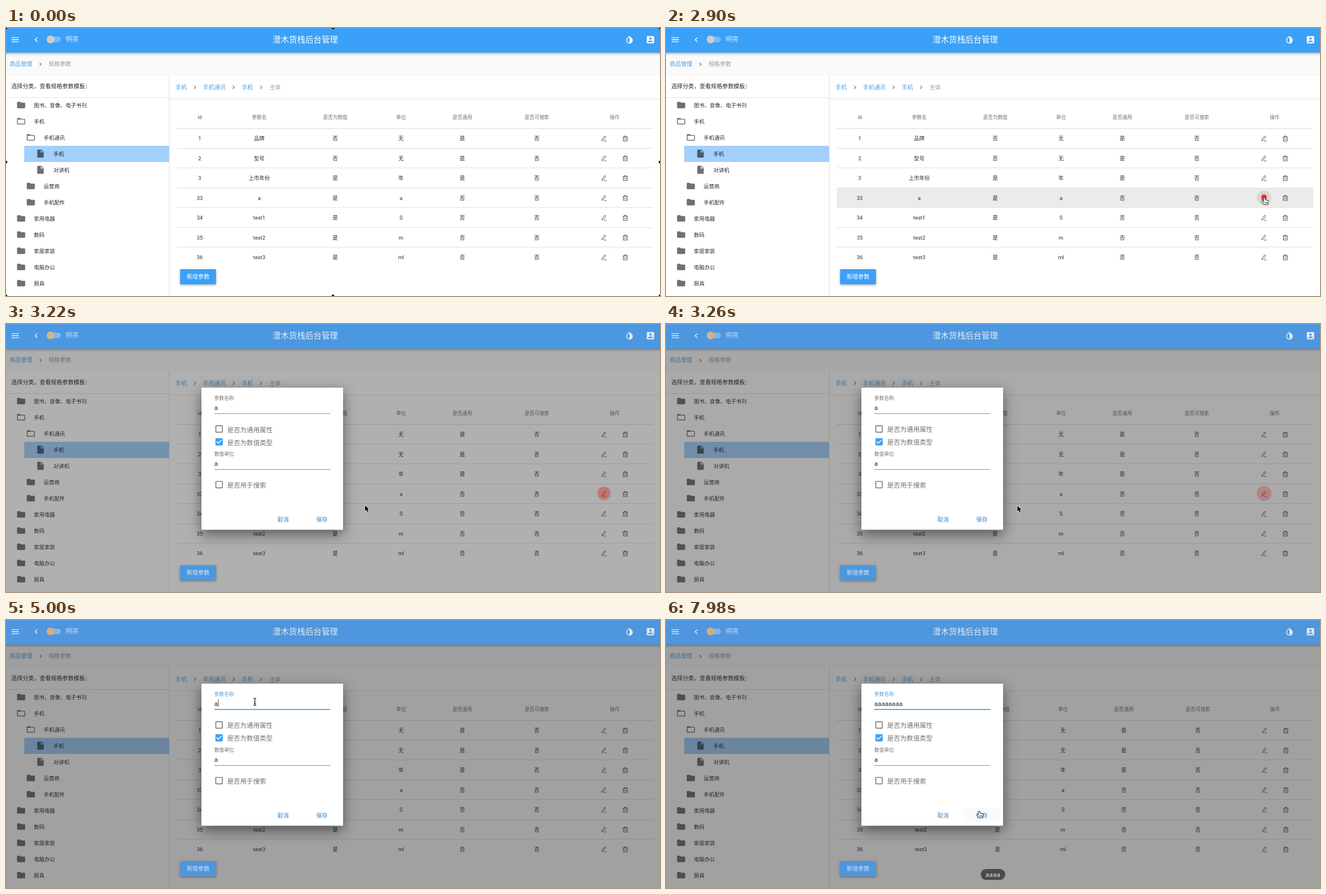
An HTML page with a canvas for the animation above (8000 ms loop, 1168 by 480 pixels).

```html
<!DOCTYPE html>
<html lang="zh-CN">
<head>
<meta charset="utf-8">
<title>后台管理</title>
<style>
html, body { margin: 0; width: 100%; height: 100%; overflow: hidden; background: #fafafa; }
canvas { display: block; width: 1168px; height: 480px; }
</style>
</head>
<body>
<canvas id="stage"></canvas>
<script>
const W = 1168, H = 480, LOOP = 8000;
const FONT = 'Roboto, "Noto Sans CJK SC", "Noto Sans CJK", sans-serif';
const BLUE = '#3ba0f8', INK = 'rgba(0,0,0,.84)', SOFT = 'rgba(0,0,0,.56)', LINK = '#4f9fe0', LINE = '#e1e1e1';
const canvas = document.getElementById('stage');
const ratio = window.devicePixelRatio || 1;
canvas.width = W * ratio;
canvas.height = H * ratio;
const c = canvas.getContext('2d');

// 24-unit icon outlines
const ICON = {
  menu: 'M3 18h18v-2H3v2zm0-5h18v-2H3v2zm0-7v2h18V6H3z',
  back: 'M15.41 7.41L14 6l-6 6 6 6 1.41-1.41L10.83 12z',
  next: 'M10 6L8.59 7.41 13.17 12l-4.58 4.59L10 18l6-6z',
  drop: 'M17.66 7.93L12 2.27 6.34 7.93c-3.12 3.12-3.12 8.19 0 11.31C7.9 20.8 9.95 21.58 12 21.58c2.05 0 4.1-.78 5.66-2.34 3.12-3.12 3.12-8.19 0-11.31zM12 19.59c-1.6 0-3.11-.62-4.24-1.76C6.62 16.69 6 15.19 6 13.59s.62-3.11 1.76-4.24L12 5.1v14.49z',
  user: 'M3 5v14c0 1.1.89 2 2 2h14c1.1 0 2-.9 2-2V5c0-1.1-.9-2-2-2H5c-1.11 0-2 .9-2 2zm12 4c0 1.66-1.34 3-3 3s-3-1.34-3-3 1.34-3 3-3 3 1.34 3 3zm-9 8c0-2 4-3.1 6-3.1s6 1.1 6 3.1v1H6v-1z',
  folder: 'M10 4H4c-1.1 0-1.99.9-1.99 2L2 18c0 1.1.9 2 2 2h16c1.1 0 2-.9 2-2V8c0-1.1-.9-2-2-2h-8l-2-2z',
  open: 'M20 6h-8l-2-2H4c-1.1 0-1.99.9-1.99 2L2 18c0 1.1.9 2 2 2h16c1.1 0 2-.9 2-2V8c0-1.1-.9-2-2-2zm0 12H4V8h16v10z',
  file: 'M6 2c-1.1 0-1.99.9-1.99 2L4 20c0 1.1.89 2 1.99 2H18c1.1 0 2-.9 2-2V8l-6-6H6zm7 7V3.5L18.5 9H13z',
  box: 'M19 5v14H5V5h14m0-2H5c-1.1 0-2 .9-2 2v14c0 1.1.9 2 2 2h14c1.1 0 2-.9 2-2V5c0-1.1-.9-2-2-2z',
  checked: 'M19 3H5c-1.11 0-2 .9-2 2v14c0 1.1.89 2 2 2h14c1.11 0 2-.9 2-2V5c0-1.1-.89-2-2-2zm-9 14l-5-5 1.41-1.41L10 14.17l7.59-7.59L19 8l-9 9z'
};
for (const name in ICON) ICON[name] = new Path2D(ICON[name]);

const TREE = [
  [0, 'folder', '图书、音像、电子书刊'], [0, 'open', '手机'], [1, 'open', '手机通讯'],
  [2, 'file', '手机'], [2, 'file', '对讲机'], [1, 'folder', '运营商'], [1, 'folder', '手机配件'],
  [0, 'folder', '家用电器'], [0, 'folder', '数码'], [0, 'folder', '家居家装'],
  [0, 'folder', '电脑办公'], [0, 'folder', '厨具'], [0, 'folder', '']
];
const HEADS = ['id', '参数名', '是否为数值', '单位', '是否通用', '是否可搜索', '操作'];
const ROWS = [
  ['1', '品牌', '否', '无', '是', '否'], ['2', '型号', '否', '无', '是', '否'],
  ['3', '上市年份', '是', '年', '是', '否'], ['33', 'a', '是', 'a', '否', '否'],
  ['34', 'test1', '是', 'S', '否', '否'], ['35', 'test2', '是', 'm', '否', '否'],
  ['36', 'test3', '是', 'ml', '否', '否']
];
const COL_X = [346, 452.3, 588, 705.5, 815, 948, 1087];
const COL_SHIFT = [0, 2.8, 4, 3.5, 2.8, 2, 0.6];

// each key press: time its bubble shows, time the field updates
const KEYS = [[5520, 5640], [5800, 5820], [6000, 6020], [6520, 6560], [6880, 6920], [7060, 7080], [7240, 7260]];
const CLICKS = [[1240, 1068, 304], [1960, 1068, 304], [2860, 1068, 303], [4240, 444, 146]];
const PATH = [
  [480, 676, 376], [640, 1067.5, 277], [1060, 1067.5, 277], [1200, 1068.5, 305.5], [3060, 1068.5, 304.5],
  [3240, 627.5, 325.5], [3460, 627.5, 325.5], [4220, 444.5, 146.5], [6520, 444.5, 146.5], [6580, 444.5, 148.5],
  [7330, 444.5, 148.5], [7590, 559, 342.5], [LOOP, 559, 342.5]
];

const clamp = x => Math.max(0, Math.min(1, x));
const ramp = (t, a, b) => clamp((t - a) / (b - a));
const smooth = x => x * x * (3 - 2 * x);
const mix = (a, b, k) => 'rgb(' + a.map((v, i) => Math.round(v + (b[i] - v) * k)) + ')';

// cubic-bezier(.25, .8, .25, 1)
function swift(x) {
  let lo = 0, hi = 1;
  for (let i = 0; i < 20; i++) {
    const s = (lo + hi) / 2;
    if (.75 * s * (1 - s) + s ** 3 < x) lo = s; else hi = s;
  }
  const r = 1 - lo;
  return x >= 1 ? 1 : 2.4 * r * r * lo + 3 * r * lo * lo + lo ** 3;
}

function rect(x, y, w, h, fill) {
  c.fillStyle = fill;
  c.fillRect(x, y, w, h);
}

function round(x, y, w, h, r, fill) {
  c.beginPath();
  c.roundRect(x, y, w, h, r);
  c.fillStyle = fill;
  c.fill();
}

function disc(x, y, r, fill) {
  c.beginPath();
  c.arc(x, y, r, 0, 7);
  c.fillStyle = fill;
  c.fill();
}

// y is the optical middle of the line
function text(s, x, y, size, fill, align = 'left', weight = 400) {
  c.font = `${weight} ${size}px ${FONT}`;
  c.textAlign = align;
  c.fillStyle = fill;
  c.fillText(s, x, y + size * .37);
}

function icon(name, x, y, fill, size = 17.45) {
  c.save();
  c.translate(x - size / 2, y - size / 2);
  c.scale(size / 24, size / 24);
  c.fillStyle = fill;
  c.fill(ICON[name], 'evenodd');
  c.restore();
}

function shadow(color, blur, y) {
  c.shadowColor = color;
  c.shadowBlur = blur * ratio;
  c.shadowOffsetY = y * ratio;
}

function header(k) {
  const white = mix([255, 255, 255], [228, 234, 238], k);
  c.save();
  shadow('rgba(0,0,0,.38)', 5, 1.5);
  rect(-10, -10, W + 20, 54, mix([59, 160, 248], [78, 150, 222], k));
  c.restore();
  icon('menu', 16.5, 21, white);
  icon('back', 54, 21, white);
  round(75, 15.5, 23, 10, 5, 'rgba(255,255,255,.3)');
  disc(79.5, 20.5, 7, mix([211, 203, 195], [210, 174, 133], k));
  text('明亮', 106.5, 20, 11.5, mix([228, 238, 247], [205, 217, 228], k));
  text('澄木货栈后台管理', 534.5, 21, 14.6, white, 'center', 500);
  icon('drop', 1113.5, 21, white);
  icon('user', 1151, 21, white);
}

function addButton(k) {
  c.save();
  shadow('rgba(0,0,0,.35)', 4, 1.5);
  round(311, 432, 64, 27, 1.5, mix([59, 160, 248], [78, 150, 222], k));
  c.restore();
  text('新增参数', 343, 445.5, 10.2, mix([255, 255, 255], [220, 226, 230], k), 'center', 500);
}

function pencil(x, y) {
  c.stroke(new Path2D(`M${x - 3.6} ${y + 4.2}l.5 -2.6l4.6 -6.2l2 1.5l-4.6 6.2zM${x + .2} ${y + 4.5}h4.6`));
}

function bin(x, y) {
  c.stroke(new Path2D(`M${x - 4.5} ${y - 2.7}h9M${x - 1.7} ${y - 2.7}v-1.8h3.4v1.8M${x - 3.5} ${y - 2.7}v7.2h7v-7.2M${x - 1.2} ${y - .6}v3.2M${x + 1.2} ${y - .6}v3.2`));
}

function sidebar() {
  rect(0, 85, 291, 395, '#fff');
  rect(291, 85, 1, 395, '#dedede');
  text('选择分类，查看规格参数模板：', 9.5, 104, 10.15, INK);
  rect(0, 124, 291, 1, LINE);
  rect(32.5, 211, 258.5, 29, '#a2cffb');
  TREE.forEach(([depth, kind, label], i) => {
    const y = 138.5 + i * 29;
    icon(kind, 27 + depth * 17.3, y - .5, SOFT);
    text(label, 49.8 + depth * 17.5, y + .3, 9.45, INK);
  });
}

function crumbs(items, y) {
  items.forEach(([label, x, arrow]) => {
    text(label, x, y, 10.15, arrow ? LINK : 'rgba(0,0,0,.38)');
    if (arrow) icon('next', arrow, y + .5, SOFT, 13);
  });
}

function table(t, name) {
  const shift = [0, .5, 1][Math.max(0, name.length - 6)];
  const colX = i => COL_X[i] + COL_SHIFT[i] * shift;
  rect(293, 85, W - 293, 395, '#fff');
  crumbs([['手机', 302.8, 337.5], ['手机通讯', 351.8, 406.5], ['手机', 421, 455.5], ['主体', 470.5]], 105.8);
  rect(293, 126.5, W - 293, 1, LINE);
  HEADS.forEach((s, i) => text(s, colX(i), 159.5, 8.75, SOFT, 'center', 500));
  rect(305, 179.5, 851, 1, '#d6d6d6');

  const hover = t < 2600 ? 0 : 1 - ramp(t, 3060, 3200);
  rect(305, 287, 851, 35, `rgba(0,0,0,${.08 * hover})`);
  ROWS.forEach((row, r) => {
    const y = 197.7 + r * 35.47;
    row.forEach((s, i) => text(r === 3 && i === 1 ? name : s, colX(i), y, 9.45, INK, 'center'));
    if (r < 6) rect(305, Math.round(y + 17.3), 851, 1, LINE);
    if (r === 3) {
      const glow = .25 * ramp(t, 2860, 2980) - .18 * ramp(t, 3060, 3220) - .07 * ramp(t, 3300, 3400);
      if (glow > .001) disc(1068.3, y, 13, `rgba(0,0,0,${glow})`);
    }
    c.strokeStyle = 'rgba(0,0,0,.68)';
    c.lineWidth = .95;
    pencil(1067.7 + shift, y + .3);
    bin(1106 + shift, y + .3);
  });
}

function field(label, value, y, focus) {
  text(label, 372, y, 8.7, focus ? LINK : SOFT);
  text(value, 372, y + 16.3, 11.63, INK);
  rect(372, y + 27, 207, 1, 'rgba(0,0,0,.45)');
  if (focus) rect(475.5 - 103.5 * focus, y + 26.5, 207 * focus, 1.6, '#2f95e6');
}

function option(label, y, on) {
  icon(on ? 'checked' : 'box', 380.5, y - 1, on ? BLUE : 'rgba(0,0,0,.56)');
  text(label, 395, y + .2, 11.6, SOFT);
}

function dialog(t, name, edited) {
  const p = swift(ramp(t, 2950, 3250));
  if (!p) return;
  const layer = p < 1 ? Math.min(1, p + .06) : 1;
  c.save();
  c.translate(475.5, 241);
  c.scale(.5 + p / 2, .5 + p / 2);
  c.translate(-475.5, -241);
  c.globalAlpha = layer;
  c.save();
  shadow('rgba(0,0,0,.5)', 24, 8);
  round(349, 114, 253, 254.5, 1.5, '#fff');
  c.restore();
  field('参数名称:', name, 133, swift(ramp(t, 4300, 4560)));
  option('是否为通用属性', 189, false);
  option('是否为数值类型', 212, true);
  field('数值单位:', 'a', 233, 0);
  option('是否用于搜索', 288.7, false);
  const hover = ramp(t, 7600, 7820);
  if (hover) round(532, 337, 64, 26, 1.5, `rgba(59,160,248,${.04 * hover})`);
  text('取消', 495, 350, 10.2, '#2f84cc', 'center', 500);
  text('保存', 564.3, 350, 10.2, '#2f84cc', 'center', 500);
  if (t >= 4300 && (t - edited) % 1000 < 500) {
    rect(372.3 + name.length * 6.33, 142.5, 1, 13, '#444');
  }
  c.restore();
}

function bubble(count, y, alpha) {
  const w = 17.5 + 6.6 * count;
  c.globalAlpha = alpha;
  round(584 - w / 2, y - 10, w, 19.5, 9.8, '#4a4a4a');
  c.font = '400 11px "Noto Sans", sans-serif';
  c.textAlign = 'center';
  c.fillStyle = '#f4f4f4';
  c.letterSpacing = '.5px';
  c.fillText('a'.repeat(count), 584.2, y + 3.5);
  c.letterSpacing = '0px';
  c.globalAlpha = 1;
}

function bubbles(t) {
  const pressed = KEYS.filter(k => t >= k[0]).length;
  if (!pressed) return;
  const lift = ramp(t, 6520, 6600);
  bubble(Math.min(pressed, 3), 456 - 25.3 * lift, 1 - ramp(t, 7640, 7900));
  if (pressed > 3) bubble(pressed - 3, 456, lift);
}

function clicks(t) {
  for (const [start, x, y] of CLICKS) {
    const age = t - start;
    if (age < 0 || age > 460) continue;
    const grow = ramp(age, 220, 460);
    disc(x, y, 5 + 11 * grow, `rgba(240,50,45,${1 - grow})`);
  }
}

function outline(d, fill, edge, width) {
  const p = new Path2D(d);
  c.lineWidth = width;
  c.lineJoin = 'round';
  c.strokeStyle = edge;
  c.stroke(p);
  c.fillStyle = fill;
  c.fill(p);
}

const CURSOR = {
  arrow: () => outline('M0 0V10.3L2.4 8.1L4.1 12L6 11.2L4.3 7.4H7.5Z', '#000', '#fff', 1.4),
  hand: () => {
    outline('M-1 1C-1 -.4 1 -.4 1.1 1L1.6 4C2.2 3.2 3.4 3.4 3.6 4.3C4.4 3.6 5.4 4 5.6 4.9C6.6 4.6 7.2 5.3 7 6.4L6.3 11.5H.4L-3.4 7.2C-3.9 6 -2.7 5.4 -1.8 6.2L-.3 7.4Z', '#fff', '#000', 1.6);
    c.lineWidth = .8;
    c.stroke(new Path2D('M1.6 7.4v2.6M3.4 7.4v2.6M5.1 7.4v2.6'));
  },
  beam: () => {
    c.strokeStyle = '#111';
    c.lineWidth = 1.2;
    c.stroke(new Path2D('M-2.5 -6.5Q0 -6.5 0 -5Q0 -6.5 2.5 -6.5M0 -5V5M-2.5 6.5Q0 6.5 0 5Q0 6.5 2.5 6.5M-1.3 2.6h2.6'));
  }
};

function pointer(t) {
  const i = PATH.findIndex(p => p[0] > t);
  if (i < 1) return;
  const [t0, x0, y0] = PATH[i - 1], [t1, x1, y1] = PATH[i];
  const k = smooth(ramp(t, t0, t1));
  const x = x0 + (x1 - x0) * k, y = y0 + (y1 - y0) * k;
  let kind = 'arrow';
  if (t >= 2600 && t < 3080 || t > 7000 && y > 337) kind = 'hand';
  else if (t > 3460 && y < 163 && x < 580) kind = 'beam';
  c.save();
  c.translate(x, y);
  CURSOR[kind]();
  c.restore();
}

function draw(t) {
  c.setTransform(ratio, 0, 0, ratio, 0, 0);
  const done = KEYS.filter(k => t >= k[1]);
  const name = 'a'.repeat(1 + done.length);
  const edited = done.length ? done[done.length - 1][1] : 4000;
  const dim = 1 - (1 - ramp(t, 2950, 3400)) ** 2;

  rect(0, 0, W, H, '#fafafa');
  crumbs([['商品管理', 6.5, 61.5], ['规格参数', 76]], 64.5);
  rect(0, 84.5, W, .8, '#ececec');
  sidebar();
  table(t, name);
  rect(0, 0, W, H, `rgba(33,33,33,${.42 * dim})`);
  header(dim);
  addButton(dim);
  dialog(t, name, edited);
  bubbles(t);
  clicks(t);
  pointer(t);

  // selection handles of the recording area
  if (t < 40) {
    for (const x of [0, W / 2, W]) for (const y of [0, H / 2, H]) {
      if (x !== W / 2 || y !== H / 2) disc(x, y, 2.4, '#111');
    }
  }
}

function tick() {
  draw(performance.now() % LOOP);
  requestAnimationFrame(tick);
}
tick();
</script>
</body>
</html>
```
